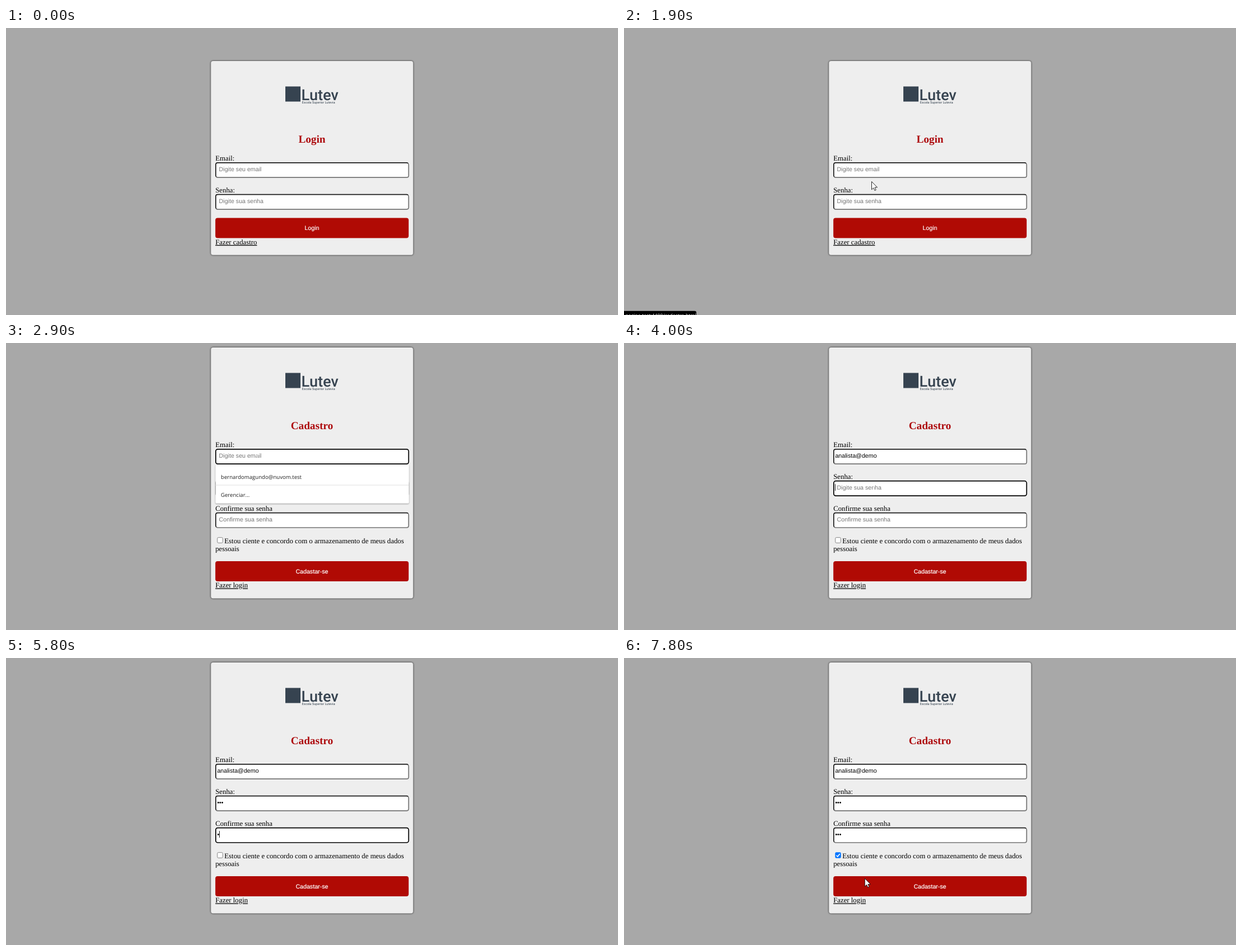
Animation of 1091 by 513 pixels, one loop 8000 ms. Source, as an HTML page:

```html
<!DOCTYPE html>
<html lang="pt-BR">
<head>
<meta charset="utf-8">
<title>Cadastro</title>
<style>
  html, body { margin: 0; width: 100%; height: 100%; overflow: hidden; background: #a8a8a8; }
  svg { display: block; width: 1091px; height: 513px; }
  text { white-space: pre; text-rendering: geometricPrecision; }
  .serif { font: 12.8px "Liberation Serif", "Times New Roman", serif; }
  .title { font: bold 19.2px "Liberation Serif", "Times New Roman", serif; fill: #ad0a0d; text-anchor: middle; }
  .sans { font: 10.67px "Liberation Sans", Arial, sans-serif; }
  .ui { font: 9.6px "Open Sans", "Noto Sans", sans-serif; fill: #222; }
  .brand { font: 500 27px Roboto, sans-serif; fill: #364350; }
  .tagline { font: 5.7px Roboto, sans-serif; fill: #364350; }
  .status { font: 8.7px "Open Sans", "Noto Sans", sans-serif; fill: #fff; }
  .panel { filter: drop-shadow(.8px .8px 1.8px rgba(0, 0, 0, .9)); }
  .menu { filter: drop-shadow(0 1px 1.2px rgba(0, 0, 0, .35)); }
</style>
</head>
<body>
<svg id="stage" viewBox="0 0 1091 513"></svg>
<script>
const LOOP = 8000, STEP = 100;
const RED = '#b00a04', SLATE = '#364350';
const EMAIL = 'analista@demo';
const stage = document.getElementById('stage');

// Cursor stops: time, x, y, shape
const cursorStops = [
  [1200, 408, 385, 'arrow'], [1300, 409, 387, 'hand'],
  [1800, 428, 332, 'arrow'], [1900, 441.5, 274.5, 'arrow'],
  [2000, 454.5, 240, 'beam'], [2100, 452, 218, 'beam'], [2200, 448, 203, 'beam'],
  [3600, 446, 232, 'beam'], [3800, 445, 258, 'beam'],
  [5200, 444, 276, 'arrow'], [5300, 440, 300, 'beam'], [5400, 438, 315, 'beam'],
  [6700, 433, 338, 'arrow'], [6800, 422, 364, 'arrow'], [6900, 402, 369, 'arrow'],
  [7000, 387, 361, 'arrow'], [7100, 380, 352, 'arrow'],
  [7400, 384, 356, 'arrow'], [7500, 398, 370, 'arrow'], [7600, 414, 383, 'arrow'],
  [7700, 425, 391, 'arrow'], [7800, 429.3, 394, 'arrow']
];

const cursorShapes = {
  arrow: '<path d="M0 0V14.3L3.3 11.3 5.5 16 7.7 15 5.6 10.4H10Z" fill="#fff" stroke="#111" stroke-width=".9"/>',
  hand: '<path d="M-1.5 10V1.2Q0-.8 1.5 1.2V6.2Q3.3 5 4.3 6.7 6 5.8 7 7.6 9.4 6.8 9.7 9V13Q9.5 16 7.8 18.5H.2L-4 12.3Q-4.6 9.4-1.5 11.3Z" fill="#fff" stroke="#111" stroke-width=".9"/>',
  beam: '<path d="M0-6.5V6.5" stroke="#fff"/>'
};

const text = (cls, x, y, value, extra = '') => `<text class="${cls}" x="${x}" y="${y}" ${extra}>${value}</text>`;
const rect = (x, y, w, h, r, extra) => `<rect x="${x}" y="${y}" width="${w}" height="${h}" rx="${r}" ${extra}/>`;
const last = (times, t) => times.filter(time => t >= time).length;
const between = (t, from, to) => t >= from && t < to;

function card(top, height, title) {
  return rect(365.3, top, 360.5, height, 4, 'class="panel" fill="#eee"') +
    rect(498, top + 45.5, 27, 27, 0, `fill="${SLATE}"`) +
    text('brand', 526.5, top + 70, 'Lutev') +
    text('tagline', 527.5, top + 76.3, 'Escola Superior Lutevia') +
    text('title', 545.4, top + 146.2, title);
}

function field(y, label, { hint, value = '', focus = false, caret = null }) {
  const shape = 'fill="none" stroke-width="1.7"';
  const right = 717.7, left = 373.9, top = y + .8, bottom = y + 27.2;
  const border = focus
    ? rect(left, top, right - left, bottom - top, 3.6, `${shape} stroke="#000"`)
    : `<path d="M${left + 1} ${bottom - 1}Q${left} ${bottom - 2} ${left} ${bottom - 4}V${top + 3.5}Q${left} ${top} ${left + 3.5} ${top}H${right - 3.5}Q${right - 2} ${top} ${right - 1} ${top + 1}" ${shape} stroke="#1c1c1c"/>` +
      `<path d="M${right - 1} ${top + 1}Q${right} ${top + 2} ${right} ${top + 4}V${bottom - 3.5}Q${right} ${bottom} ${right - 3.5} ${bottom}H${left + 3.5}Q${left + 2} ${bottom} ${left + 1} ${bottom - 1}" ${shape} stroke="#737373"/>`;
  return text('serif', 373.2, y - 3.2, label) +
    rect(left, top, right - left, bottom - top, 3.6, 'fill="#fff"') + border +
    (value ? text('sans', 376.4, y + 16.2, value) : text('sans', 379.6, y + 16.2, hint, 'fill="#757575"')) +
    (caret === null ? '' : rect(caret, y + 6.3, .9, 12, 0, 'fill="#000"'));
}

function button(y, label, link) {
  return rect(373.2, y, 344.6, 36, 4, `fill="${RED}"`) +
    text('sans', 545.4, y + 21.7, label, 'fill="#fff" stroke="#fff" stroke-width=".2" text-anchor="middle"') +
    text('serif', 373.2, y + 47.5, link, 'text-decoration="underline"');
}

function loginPage() {
  return card(59, 346.8, 'Login') +
    field(240, 'Email:', { hint: 'Digite seu email' }) +
    field(296.9, 'Senha:', { hint: 'Digite sua senha' }) +
    button(339.4, 'Login', 'Fazer cadastro');
}

function checkbox(checked) {
  return checked
    ? rect(376.4, 347.3, 10.4, 10.4, 2, 'fill="#0075ff"') +
      '<path d="M378.6 352.7L380.8 355 384.8 350" fill="none" stroke="#fff" stroke-width="1.6"/>'
    : rect(376.8, 347.7, 9.6, 9.6, 1.8, 'fill="#fff" stroke="#767676" stroke-width=".9"');
}

function menu() {
  return rect(373.4, 217.6, 345, 69.2, 2, 'class="menu" fill="#fff"') +
    rect(373.4, 253.6, 345, .9, 0, 'fill="#ddd"') +
    text('ui', 383, 243.3, 'bernardomagundo@nuvom.test') +
    text('ui', 383, 274.6, 'Gerenciar...');
}

function signupPage(t) {
  const typed = EMAIL.slice(0, Math.round(EMAIL.length * last([3400, 3500, 3600, 3700, 3800], t) / 5));
  const secret = last([4700, 4900, 5100], t);
  const repeat = last([5800, 6400, 6600], t);
  const dots = n => '•'.repeat(n);
  const dotCaret = n => 376.3 + n * 3.73;
  const emailCaret = typed ? 376.6 + typed.length * 5.72 : 376.3;

  return card(8, 448.6, 'Cadastro') +
    field(189, 'Email:', {
      hint: 'Digite seu email', value: typed, focus: between(t, 2500, 4000),
      caret: between(t, 2500, 2900) || between(t, 3400, 4000) ? emailCaret : null
    }) +
    field(245.9, 'Senha:', {
      hint: 'Digite sua senha', value: dots(secret), focus: between(t, 4000, 5600),
      caret: between(t, 4000, 4500) || between(t, 4700, 5600) ? dotCaret(secret) : null
    }) +
    field(302.8, 'Confirme sua senha', {
      hint: 'Confirme sua senha', value: dots(repeat), focus: between(t, 5600, 7300),
      caret: between(t, 5600, 7100) ? dotCaret(repeat) : null
    }) +
    checkbox(t >= 7300) +
    text('serif', 389.3, 357.8, 'Estou ciente e concordo com o armazenamento de meus dados') +
    text('serif', 373.2, 372.3, 'pessoais') +
    button(389.9, 'Cadastar-se', 'Fazer login') +
    (between(t, 2500, 3400) ? menu() : '');
}

function statusBar(t) {
  const opacity = between(t, 1600, 2100) ? 1 : t === 1500 || t === 2100 ? .5 : 0;
  if (!opacity) return '';
  return `<g opacity="${opacity}">` + rect(-4, 505.8, 133, 20, 3, 'fill="#000"') +
    text('status', 2.5, 517, 'pagina.test:4400/cadastro.html') + '</g>';
}

function cursor(t) {
  if (t < 400) return '';
  let [, x, y, shape] = cursorStops[Math.max(0, last(cursorStops.map(s => s[0]), t) - 1)];
  if (t < 1200) {
    const p = (t - 400) / 800, eased = 1 - (1 - p) ** 2;
    x = 124.5 + (x - 124.5) * eased;
    y = 26.5 + (y - 26.5) * eased;
  }
  return `<g transform="translate(${x} ${y})">${cursorShapes[shape]}</g>`;
}

let shown = -1;
function draw() {
  const t = Math.floor(performance.now() % LOOP / STEP) * STEP;
  if (t !== shown) {
    shown = t;
    stage.innerHTML = rect(0, 0, 1091, 513, 0, 'fill="#a8a8a8"') +
      (t < 2000 ? loginPage() : signupPage(t)) + statusBar(t) + cursor(t);
  }
  requestAnimationFrame(draw);
}
draw();
</script>
</body>
</html>
```
